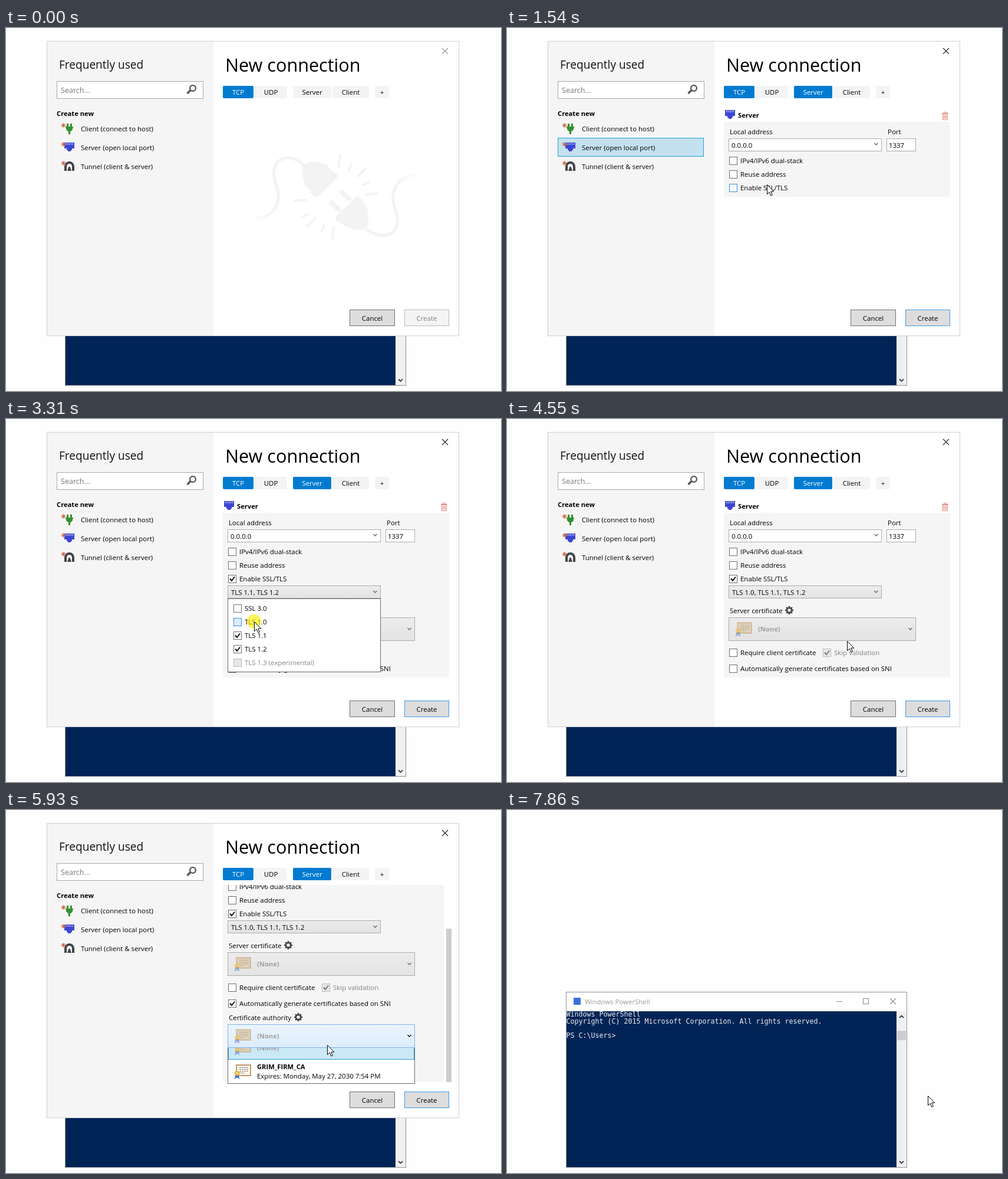
An HTML page with a canvas for the animation above (8000 ms loop, 840 px wide and 615 px high).

```html
<!DOCTYPE html>
<html lang="en">
<head>
<meta charset="utf-8">
<title>New connection</title>
<style>
html, body { margin: 0; width: 100%; height: 100%; overflow: hidden; background: #fefefe; }
canvas { display: block; }
</style>
</head>
<body>
<canvas id="stage" width="840" height="615"></canvas>
<script>
const g = document.getElementById('stage').getContext('2d');
const LOOP = 8000;
const UI = '11.45px "Open Sans", sans-serif';
const BOLD = 'bold 11.2px "Open Sans", sans-serif';

// time, x, y, linear?
const PATH = [
  [70, 300, 512], [690, 205, 205], [1000, 205, 205], [1540, 441, 265, 1], [1620, 444, 267],
  [1860, 444, 267], [2080, 444, 293], [2300, 444, 293], [2610, 444, 309], [2660, 444, 309],
  [2830, 436, 320], [2990, 436, 320], [3240, 421, 343], [3460, 421, 343], [3930, 685, 344],
  [4360, 685, 344], [4550, 577, 376, 1], [4800, 490, 423, 1], [5440, 490, 423], [5750, 545, 398],
  [5930, 545, 398], [6230, 477, 472], [6270, 477, 472], [6310, 484, 471], [6430, 484, 471],
  [6620, 492, 468], [6870, 492, 468], [7170, 632, 484, 1], [7450, 714, 484, 1], [LOOP, 714, 484]
];
// press, release
const CLICKS = [[770, 840], [1700, 1780], [2150, 2220], [3310, 3460], [4160, 4240],
  [4930, 5010], [5780, 5850], [6780, 6860], [7780, 7860]];

let t = 0, off = 0, mouse = { x: 0, y: 0 }, pressed = false, blocked = false;

const between = (a, b) => t >= a && t < b;
const hot = (x, y, w, h) => t >= 70 && mouse.x >= x && mouse.x < x + w &&
  mouse.y + off >= y && mouse.y + off < y + h;

function cursorAt() {
  let i = 0;
  while (i < PATH.length - 2 && t >= PATH[i + 1][0]) i++;
  const [t0, x0, y0] = PATH[i], [t1, x1, y1, linear] = PATH[i + 1];
  let k = Math.min(1, Math.max(0, (t - t0) / (t1 - t0)));
  if (!linear) k = k * k * (3 - 2 * k);
  return { x: Math.round(x0 + (x1 - x0) * k), y: Math.round(y0 + (y1 - y0) * k) };
}

function fill(x, y, w, h, c) { g.fillStyle = c; g.fillRect(x, y, w, h); }

function box(x, y, w, h, bg, edge) {
  fill(x, y, w, h, edge);
  fill(x + 1, y + 1, w - 2, h - 2, bg);
}

function text(s, x, y, c = '#000', font = UI, align = 'left') {
  g.font = font; g.fillStyle = c; g.textAlign = align;
  g.fillText(s, x, y);
}

function line(c, w, ...p) {
  g.strokeStyle = c; g.lineWidth = w;
  g.beginPath();
  for (let i = 0; i < p.length; i += 2) g.lineTo(p[i], p[i + 1]);
  g.stroke();
}

function poly(c, ...p) {
  g.fillStyle = c; g.beginPath();
  for (let i = 0; i < p.length; i += 2) g.lineTo(p[i], p[i + 1]);
  g.fill();
}

function disc(x, y, r, c) {
  g.fillStyle = c; g.beginPath(); g.arc(x, y, r, 0, 7); g.fill();
}

function shade(y, h, top, bottom) {
  const s = g.createLinearGradient(0, y, 0, y + h);
  s.addColorStop(0, top); s.addColorStop(1, bottom);
  return s;
}

const cross = (x, y, r, c) => {
  line(c, 1.1, x - r, y - r, x + r, y + r);
  line(c, 1.1, x - r, y + r, x + r, y - r);
};
const chevron = (x, y, c) => line(c, 1.3, x - 3, y - 1.5, x, y + 1.5, x + 3, y - 1.5);

function consoleWindow() {
  box(100, 308, 579, 298, '#fff', '#8f9298');
  fill(101, 341, 560, 264, '#012456');
  fill(661, 341, 17, 264, '#f0f0f0');
  fill(662, 374, 15, 16, '#cdcdcd');
  line('#404040', 1.8, 666, 352, 669.5, 348.5, 673, 352);
  line('#404040', 1.8, 666, 595, 669.5, 598.5, 673, 595);
  fill(113, 318, 12, 12, '#3b70dc');
  text('Windows PowerShell', 132, 329, '#999');
  fill(559, 324, 10, 1, '#888');
  g.strokeStyle = '#888'; g.lineWidth = 1; g.strokeRect(604.5, 319.5, 9, 9);
  cross(655, 324, 5, '#888');
  const mono = '11.63px "DejaVu Sans Mono", monospace';
  g.save();
  g.beginPath(); g.rect(101, 341, 560, 264); g.clip();
  ['Windows PowerShell', 'Copyright (C) 2015 Microsoft Corporation. All rights reserved.', '', 'PS C:\\Users>']
    .forEach((s, i) => text(s, 100.5, 350 + 12 * i, '#eeedf0', mono));
  g.restore();
}

function star(x, y) {
  for (let i = 0; i < 4; i++) {
    const a = i * Math.PI / 4, c = Math.cos(a) * 3.8, s = Math.sin(a) * 3.8;
    line('#d0603c', 1.1, x - c, y - s, x + c, y + s);
  }
}

function portIcon(x, y) {
  poly('#3c46d0', x, y, x + 17, y, x + 17, y + 10, x + 13, y + 10, x + 13, y + 13, x + 11, y + 13,
    x + 11, y + 15, x + 6, y + 15, x + 6, y + 13, x + 4, y + 13, x + 4, y + 10, x, y + 10);
  for (let i = 0; i < 6; i++) fill(x + 2 + i * 2.4, y + 1, 1, 3, '#c5c8f4');
}

function plugIcon(x, y) {
  const c = '#35902f';
  fill(x + 2, y, 3, 5, c); fill(x + 8, y, 3, 5, c);
  fill(x, y + 5, 13, 2, c);
  poly(c, x + 1, y + 7, x + 12, y + 7, x + 12, y + 10, x + 9, y + 13, x + 4, y + 13, x + 1, y + 10);
  fill(x + 5, y + 12, 3, 6, c);
}

function tunnelIcon(x, y) {
  const arch = (l, top, r, b, c) => {
    const m = (l + r) / 2, k = m - l;
    g.fillStyle = c; g.beginPath(); g.moveTo(l, b);
    g.arc(m, top + k, k, Math.PI, 0); g.lineTo(r, b); g.fill();
  };
  arch(x, y, x + 17, y + 16, '#42424a');
  arch(x + 4, y + 4, x + 13, y + 16, '#f5f5f5');
  poly('#42424a', x + 5, y + 16, x + 7.5, y + 9, x + 9.5, y + 9, x + 12, y + 16);
}

function sidebar() {
  fill(70, 23, 282, 498, '#f5f5f5');
  text('Frequently used', 90, 69, '#111', '19.1px "Open Sans", sans-serif');
  box(86, 90, 249, 30, '#fff', '#a8a8a8');
  text('Search...', 93, 110, '#777', '12.6px "Open Sans", sans-serif');
  line('#555', 3.4, 313.5, 105, 307.5, 111);
  g.lineWidth = 2.3; g.beginPath(); g.arc(317, 102, 4.9, 0, 7); g.stroke();
  text('Create new', 86, 149, '#000', BOLD);
  const items = ['Client (connect to host)', 'Server (open local port)', 'Tunnel (client & server)'];
  items.forEach((s, i) => {
    const y = 154 + 32 * i;
    if (i === 1 && between(770, 1780)) box(86, y, 248, 32, '#c4e1ef', '#26a0da');
    else if (hot(86, y, 248, 32)) box(86, y, 248, 32, '#dceaf2', '#8cc6e2');
    [plugIcon, portIcon, tunnelIcon][i](i === 0 ? 101 : 99, y + 8);
    star(97.5, y + 11);
    text(s, 127, y + 21);
  });
}

function watermark() {
  const c = '#f3f3f3';
  g.save();
  g.lineCap = 'round';
  const cord = (p, x0, x1) => {
    const s = g.createLinearGradient(x0, 0, x1, 0);
    s.addColorStop(0, '#fff'); s.addColorStop(1, c);
    g.strokeStyle = s; g.lineWidth = 5; g.stroke(new Path2D(p));
  };
  cord('M420 323C452 322 465 300 462 278C458 258 447 246 462 226C474 215 495 220 507 235', 412, 455);
  cord('M707 247C670 248 655 268 657 292C660 312 673 326 657 345C642 358 625 350 608 338', 708, 660);
  g.fillStyle = c;
  g.fill(new Path2D('M525 287Q516 281 517 275Q504 267 504 252L502 236L512 228Q531 223 547 234Q551 243 562 247Q565 251 560 255L530 285Z'));
  g.fill(new Path2D('M561 327Q557 321 562 317L594 287Q600 283 603 291Q615 301 614 318L616 332L606 342Q588 344 573 334Z'));
  line(c, 8, 570, 278, 582, 289);
  line(c, 8, 552, 296, 564, 307);
  [[567, 216, 565, 235], [585, 231, 582, 241], [610, 238, 597, 251], [616, 261, 607, 266], [630, 280, 611, 282],
    [490, 293, 509, 291], [512, 315, 503, 320], [525, 322, 511, 336], [539, 335, 536, 345], [556, 338, 554, 356]]
    .forEach(p => line(c, 4, ...p));
  g.restore();
}

function check(x, y, label, on, { dim = false, w = 100 } = {}) {
  const h = !dim && !blocked && hot(x - 1, y - 2, w, 18);
  const bg = dim ? '#e6e6e6' : h ? (pressed ? '#d9ecff' : '#f3f9ff') : '#fff';
  box(x, y, 14, 14, bg, dim ? '#bcbcbc' : h ? '#3c8fe8' : '#707070');
  if (on) line(dim ? '#777' : '#111', 2, x + 3, y + 6.5, x + 6, y + 10, x + 11, y + 3.5);
  text(label, x + 19, y + 11, dim ? '#838383' : '#000');
}

function combo(x, y, w, h, { open = false, off: disabled = false } = {}) {
  const lit = open || (!disabled && !blocked && hot(x, y, w, h));
  const bg = lit ? shade(y, h, '#ecf4fc', '#dcecfc') : shade(y, h, '#ececec', '#e3e3e3');
  box(x, y, w, h, bg, lit ? '#7eb4ea' : '#acacac');
  chevron(x + w - 9.5, y + h / 2 - 0.5, lit ? '#000' : '#666');
}

function gear(x, y) {
  for (let i = 0; i < 8; i++) {
    const a = i * Math.PI / 4, c = Math.cos(a), s = Math.sin(a);
    line('#404040', 2.6, x + c * 4, y + s * 4, x + c * 7, y + s * 7);
  }
  g.lineWidth = 2.4; g.beginPath(); g.arc(x, y, 4, 0, 7); g.stroke();
}

function certificate(x, y, named, ticked) {
  g.save();
  if (!named) g.globalAlpha = 0.45;
  box(x + 14, y + 8, 26, 20, '#b08a58', '#c9a878');
  fill(x + 16, y + 10, 22, 16, '#fdf8ec');
  for (let i = 0; i < 4; i++) {
    g.setLineDash([3, 1]);
    line('#777', 1, x + 20, y + 13.5 + 3 * i, x + (i === 3 ? 29 : 35), y + 13.5 + 3 * i);
  }
  g.setLineDash([]);
  poly('#3f6fd8', x + 13, y + 25, x + 19, y + 25, x + 20, y + 33, x + 16, y + 30, x + 12, y + 33);
  disc(x + 16, y + 23, 4.2, '#f0b429');
  disc(x + 16, y + 23, 2, '#fbdc7c');
  g.restore();
  if (ticked) {
    disc(x + 38, y + 25, 7, '#2a9a35');
    line('#fff', 2, x + 34.5, y + 25, x + 37, y + 28, x + 41.5, y + 22);
  }
  if (named) {
    text('GRIM_FIRM_CA', x + 50, y + 16, '#000', BOLD);
    text('Expires: Monday, May 27, 2030 7:54 PM', x + 50, y + 32);
  } else {
    text('(None)', x + 50, y + 24, '#a0a0a0', BOLD);
  }
}

function trash(x, y) {
  const c = '#e08a7c';
  fill(x, y + 2, 11, 1, c); fill(x + 4, y, 3, 1, c); fill(x + 3, y, 1, 2, c); fill(x + 7, y, 1, 2, c);
  g.strokeStyle = c; g.lineWidth = 1; g.strokeRect(x + 1.5, y + 3.5, 8, 10);
  for (let i = 0; i < 3; i++) fill(x + 3 + i * 2, y + 5, 1, 7, c);
}

function serverPanel() {
  const ssl = t >= 1780, auto = t >= 5010, bar = between(5010, 6860), picked = t >= 6860;
  const right = bar ? 743 : 752;
  g.save();
  g.beginPath(); g.rect(360, 127, 400, 334); g.clip();
  g.translate(0, -off);
  portIcon(370, 139);
  text('Server', 392, 152, '#000', BOLD);
  if (t >= 1000) trash(right - 14, 142);
  fill(368, 159, right - 368, (auto ? 556 : ssl ? 438 : 286) - 159, '#f5f5f5');
  text('Local address', 378, 180);
  text('Port', 646, 180);
  box(376, 187, 260, 22, '#fff', '#acacac');
  text('0.0.0.0', 381, 203);
  chevron(626.5, 196.5, '#666');
  box(644, 187, 50, 22, '#fff', '#acacac');
  text('1337', 648, 203);
  check(377, 218, 'IPv4/IPv6 dual-stack', false, { w: 128 });
  check(377, 241, 'Reuse address', false);
  check(377, 264, 'Enable SSL/TLS', ssl);
  if (ssl) {
    combo(376, 282, 260, 22);
    text((t >= 3460 ? 'TLS 1.0, ' : '') + 'TLS 1.1, TLS 1.2', 382, 298);
    text('Server certificate', 378, 329);
    gear(479, 324);
    combo(376, 336, 318, 40, { off: auto });
    certificate(376, 336, false);
    check(377, 389, 'Require client certificate', false, { w: 148 });
    check(536, 389, 'Skip validation', true, { dim: true });
    check(377, 416, 'Automatically generate certificates based on SNI', auto, { w: 277 });
  }
  if (auto) {
    text('Certificate authority', 378, 451);
    gear(496, 446);
    combo(376, 458, 318, 40, { open: between(5850, 6860) });
    certificate(376, 458, picked, picked);
    text('Generated certificate CN prefix', 378, 519);
    box(376, 526, 260, 22, '#fff', '#acacac');
    text('DO_NOT_TRUST_', 379, 542);
  }
  g.restore();
  if (bar) fill(747, 127 + Math.round(off * 74 / 95), 9, 260, '#cdcdcd');
}

// Slides a drop-down of height h out from under y.
function dropDown(x, y, w, h, since, paint) {
  const k = Math.min(1, (t - since) / 160), out = 1 - (1 - k) * (1 - k);
  g.save();
  g.beginPath(); g.rect(x, y, w, h); g.clip();
  g.translate(0, Math.round(h * (out - 1)));
  box(x, y, w, h, '#fff', '#6a6a6a');
  paint();
  g.restore();
}

function protocolList() {
  ['SSL 3.0', 'TLS 1.0', 'TLS 1.1', 'TLS 1.2', 'TLS 1.3 (experimental)'].forEach((s, i) =>
    check(386, 314 + 23 * i, s, i === 2 || i === 3 || (i === 1 && t >= 3460), { dim: i === 4, w: 140 }));
}

function authorityList() {
  const second = mouse.y >= 443;
  box(377, second ? 443 : 403, 316, 40, '#cbe8f6', '#26a0da');
  certificate(376, 403, false);
  certificate(376, 443, true);
}

function tab(s, x, w, on) {
  g.fillStyle = on ? '#007bd0' : '#f4f4f4';
  g.beginPath(); g.roundRect(x, 98, w, 21, 2); g.fill();
  text(s, x + w / 2, 113, on ? '#fff' : '#000', UI, 'center');
}

function button(s, x, w, edge, enabled) {
  const h = enabled && hot(x, 477, w, 28);
  const bg = !enabled ? '#f4f4f4' : !h ? '#ddd' : pressed ? '#c4e5f6' : '#bee6fd';
  box(x, 477, w, 28, bg, !enabled ? '#b5b8bb' : h ? '#3c7fb1' : edge);
  text(s, x + w / 2, 496, enabled ? '#000' : '#838383', UI, 'center');
}

function dialog() {
  const server = t >= 840;
  box(69, 22, 700, 500, '#fff', '#cdd0dc');
  off = 0;
  sidebar();
  text('New connection', 372, 74, '#000', '30.6px "Open Sans", sans-serif');
  cross(745, 39, 5, t < 70 ? '#999' : '#222');
  tab('TCP', 368, 52, true);
  tab('UDP', 422, 55, false);
  tab('Server', 487, 65, server);
  tab('Client', 554, 62, false);
  tab('+', 626, 24, false);
  button('Cancel', 583, 77, '#707070', true);
  button('Create', 676, 76, '#3c9ae8', server);
  if (!server) return watermark();

  const protocols = between(2220, 4160), authorities = between(5850, 6860);
  off = t >= 5250 ? 95 : t >= 5160 ? 48 : 0;
  blocked = (protocols && mouse.y > 304) || authorities;
  serverPanel();
  off = 0;
  blocked = false;
  if (protocols) dropDown(376, 304, 260, 125, 2220, protocolList);
  if (authorities) dropDown(376, 403, 318, 81, 5850, authorityList);
}

function pointer() {
  const { x, y } = mouse;
  if (pressed) disc(x, y, 12, 'rgba(255,240,0,.65)');
  g.save();
  g.translate(x + 0.5, y + 0.5);
  const p = new Path2D('M0 0V16L3.7 12.6L6.3 18.5L8.8 17.4L6.2 11.6H11.3Z');
  g.fillStyle = '#fff'; g.fill(p);
  g.strokeStyle = '#000'; g.lineWidth = 1; g.stroke(p);
  g.restore();
}

function draw(now) {
  t = now % LOOP;
  mouse = cursorAt();
  pressed = CLICKS.some(([a, b]) => between(a, b));
  fill(0, 0, 840, 615, '#fefefe');
  consoleWindow();
  if (t < 7860) dialog();
  if (t >= 70) pointer();
}

let start;
function tick(now) {
  start ??= now;
  draw(now - start);
  requestAnimationFrame(tick);
}
draw(0);
requestAnimationFrame(tick);
</script>
</body>
</html>
```
